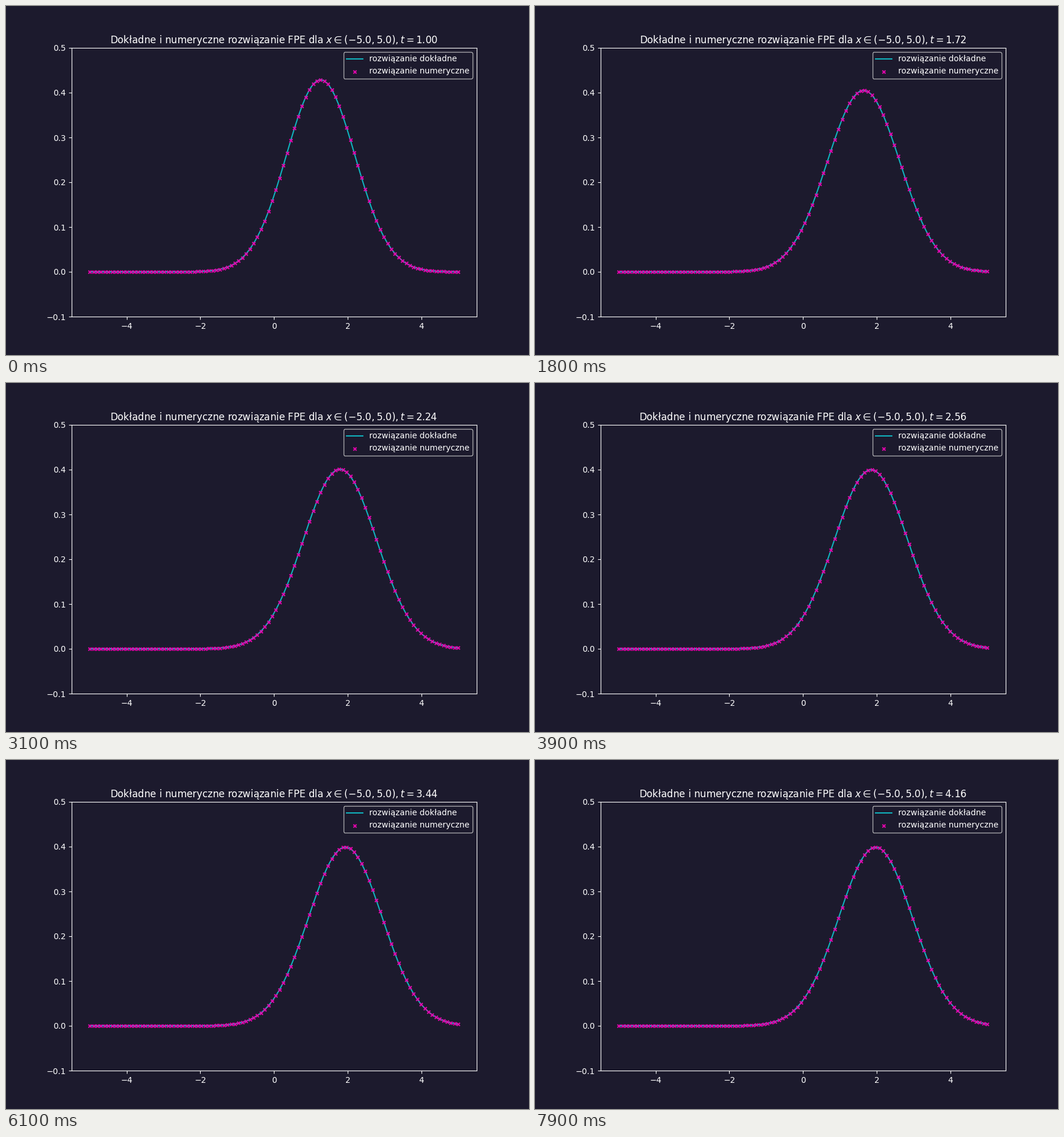
A matplotlib script for the animation above (8000 ms loop, 900 by 600 pixels).

```python
import numpy as np
import matplotlib.pyplot as plt
from matplotlib.animation import FuncAnimation

BG = "#1c1a2d"
CYAN = "#10b5bf"
PINK = "#e305ad"
FRAMES, INTERVAL = 80, 100
T0, DT = 1.0, 0.04
X_END = 5.0

plt.rcParams.update({
    "font.family": "DejaVu Sans",
    "figure.facecolor": BG,
    "axes.facecolor": BG,
    "axes.edgecolor": "white",
    "text.color": "white",
    "xtick.color": "white",
    "ytick.color": "white",
    "legend.edgecolor": "0.8",
})


def density(x, t):
    """Ornstein-Uhlenbeck density started at 0, drifting towards 2."""
    mean = 2 * (1 - np.exp(-t))
    var = 1 - np.exp(-2 * t)
    return np.exp(-(x - mean) ** 2 / (2 * var)) / np.sqrt(2 * np.pi * var)


x = np.linspace(-X_END, X_END, 100)

fig, ax = plt.subplots(figsize=(9, 6), dpi=100)
line, = ax.plot(x, density(x, T0), color=CYAN, lw=1.5,
                label="rozwiązanie dokładne")
dots = ax.scatter(x, density(x, T0), s=15, marker="x", color=PINK, zorder=3,
                  label="rozwiązanie numeryczne")
ax.set_xlim(-5.5, 5.5)
ax.set_ylim(-0.1, 0.5)
ax.legend(loc="upper right")
title = ax.set_title("")


def update(i):
    t = T0 + DT * i
    y = density(x, t)
    line.set_ydata(y)
    dots.set_offsets(np.column_stack([x, y]))
    title.set_text("Dokładne i numeryczne rozwiązanie FPE dla "
                   rf"$x\in({-X_END}, {X_END}), t={t:.2f}$")
    return line, dots, title


anim = FuncAnimation(fig, update, frames=FRAMES, interval=INTERVAL,
                     repeat=True, repeat_delay=0, blit=False)
plt.show()
```
